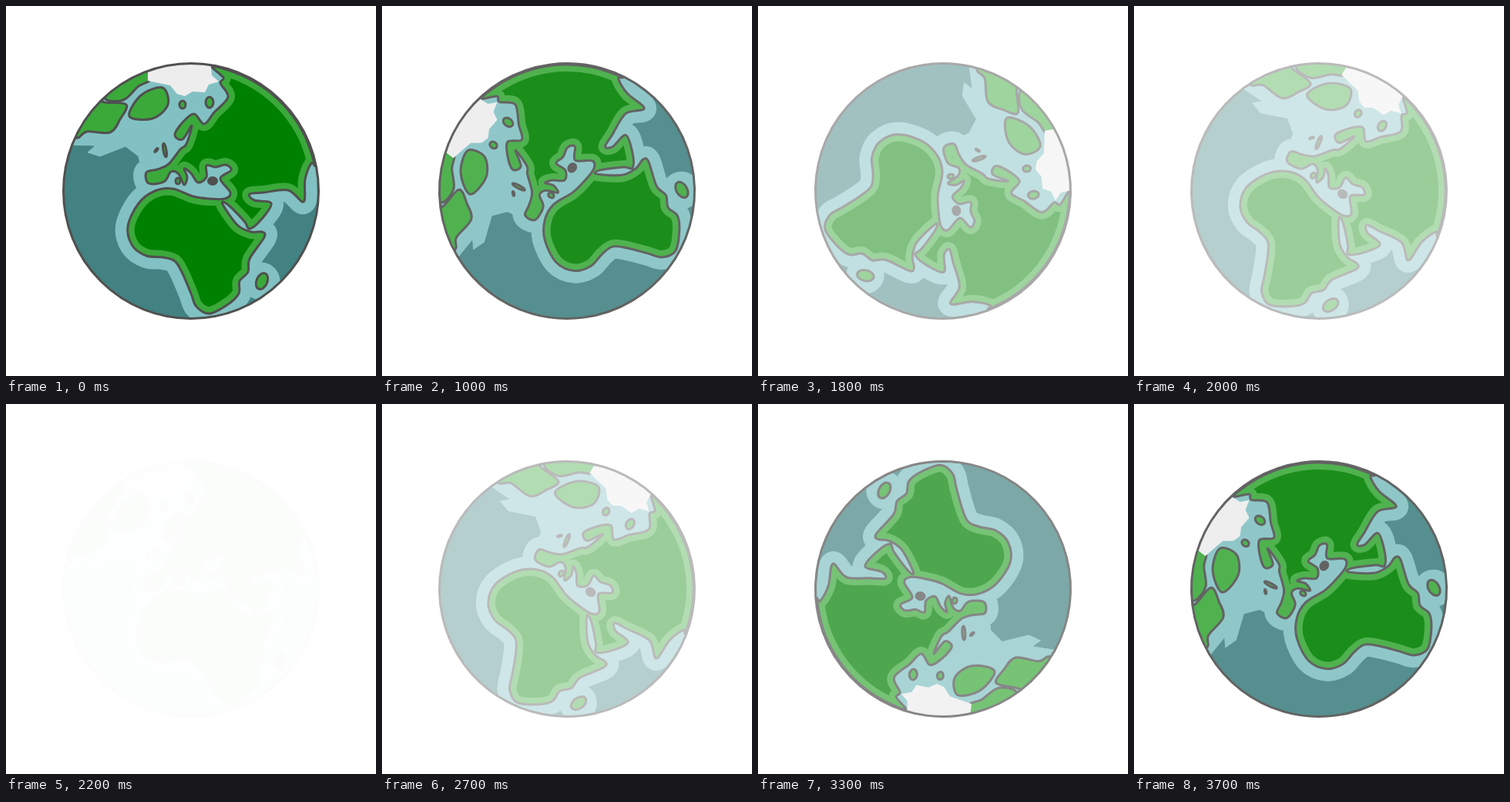
These frames come from a looping animation (480 by 480 pixels, 3900 ms). An HTML page:

```html
<!DOCTYPE html>
<html lang="en">
<head>
<meta charset="utf-8">
<title>Spinning globe</title>
<style>
html, body { margin: 0; width: 100%; height: 100%; overflow: hidden; background: #fff; }
svg { display: block; width: 100vw; height: 100vh; }
path { stroke-linejoin: round; }
.ink { stroke: #505050; stroke-width: 3; }
.land { fill: #3aa93a; }
.shallow { fill: #82c1c3; stroke: #82c1c3; }
</style>
</head>
<body>
<svg viewBox="0 0 480 480">
  <defs>
    <clipPath id="disc"><circle cx="240" cy="240" r="166"/></clipPath>
    <clipPath id="coast"><path class="main"/></clipPath>
  </defs>
  <g id="globe">
    <g clip-path="url(#disc)">
      <circle cx="240" cy="240" r="166" fill="#428282"/>
      <path class="shallow" d="M80 180L116 181 106 190 122 195 155 182 172 195 176 215 240 190 295 120 280 70 170 70z"/>
      <path class="main shallow" stroke-width="32"/>
      <circle class="shallow" cx="331" cy="357" r="24"/>
      <path class="main" fill="#008000"/>
      <path class="main" fill="none" stroke="#3aa93a" stroke-width="18" clip-path="url(#coast)"/>
      <path class="main ink" fill="none"/>
      <ellipse cx="268" cy="227" rx="7" ry="6" fill="#505050"/>
      <g id="islands" class="land ink">
        <ellipse rx="4" ry="5" transform="translate(229 128)"/>
        <ellipse rx="5" ry="7" transform="translate(264 125)"/>
        <ellipse rx="2" ry="9" transform="translate(206 187) rotate(-10)"/>
        <ellipse rx="3" ry="1" transform="translate(195 187) rotate(-50)"/>
        <ellipse rx="3" ry="4" transform="translate(223 227)"/>
        <ellipse rx="7" ry="11" transform="translate(332 357) rotate(22)"/>
      </g>
      <path fill="#ededed" d="M184 70V97L213 103 222 114 232 117 242 111 258 112 263 102 276 98 267 90 265 70z"/>
    </g>
    <circle class="ink" cx="240" cy="240" r="165.5" fill="none"/>
  </g>
</svg>
<script>
const africa = `193,240 172,256 158,286 164,311 182,324 203,326 219,331 229,347 240,373
  247,390 264,399 288,387 302,373 303,357 314,345 316,328 335,300 332,293 318,293 300,284 281,257`;
const southAsia = `287,257 309,279 316,289 332,276 344,256 322,252 316,244 334,242 366,239
  386,254 388,225 396,204`;
const north = `282,93 278,100 288,118 270,138 257,153 244,140 230,150 219,167 229,173
  241,155 234,179 226,186 211,205`;
const south = `196,212 182,216 185,230 205,228 214,215 224,218 231,232 235,222 231,211 240,217
  249,229 260,222 260,207 272,209 285,206 292,213 278,224 291,242 284,250 264,250 243,247 216,237`;
const arctic = [
  "160,143 175,116 203,106 210,128 190,146",
  "80,165 93,171 105,163 135,164 148,147 156,128 128,125 100,120",
  "128,119 152,122 172,104 188,95 188,75 140,90"
];

// closed smooth curve through points
function curve(text) {
  const p = text.trim().split(/\s+/).map(s => s.split(",").map(Number));
  const at = i => p[(i + p.length) % p.length];
  const handle = (i, side) => at(i).map((v, k) => v + side * (at(i + 1)[k] - at(i - 1)[k]) / 6);
  return "M" + p[0] + p.map((_, i) => `C${handle(i, 1)} ${handle(i + 1, -1)} ${at(i + 1)}`).join("") + "Z";
}

// Eurasia follows the rim of the disc
const rim = Array.from({ length: 6 }, (_, i) => {
  const a = -0.21 - i * 0.238;
  return [240 + 164 * Math.cos(a), 240 + 164 * Math.sin(a)];
}).join(" ");

const mainland = curve([africa, southAsia, rim, north, south].join(" "));
document.querySelectorAll(".main").forEach(el => el.setAttribute("d", mainland));
document.getElementById("islands").innerHTML += arctic.map(s => `<path d="${curve(s)}"/>`).join("");

const globe = document.getElementById("globe");

function draw(now) {
  const t = now % 3900;
  // seven steps out, a pause, the same steps back
  const k = Math.max(0, Math.min(7, Math.floor((t - 800) / 200), Math.ceil((3900 - t) / 200)));
  const turn = k && 66.8 * k - 1.68 * k * k - 12.7;
  const fade = k === 7 ? 0.01 : k ? 0.99 - k / 10 : 1;
  globe.setAttribute("transform", `rotate(${-turn} 240 240)`);
  globe.setAttribute("opacity", fade);
  requestAnimationFrame(draw);
}
draw(0);
</script>
</body>
</html>
```
